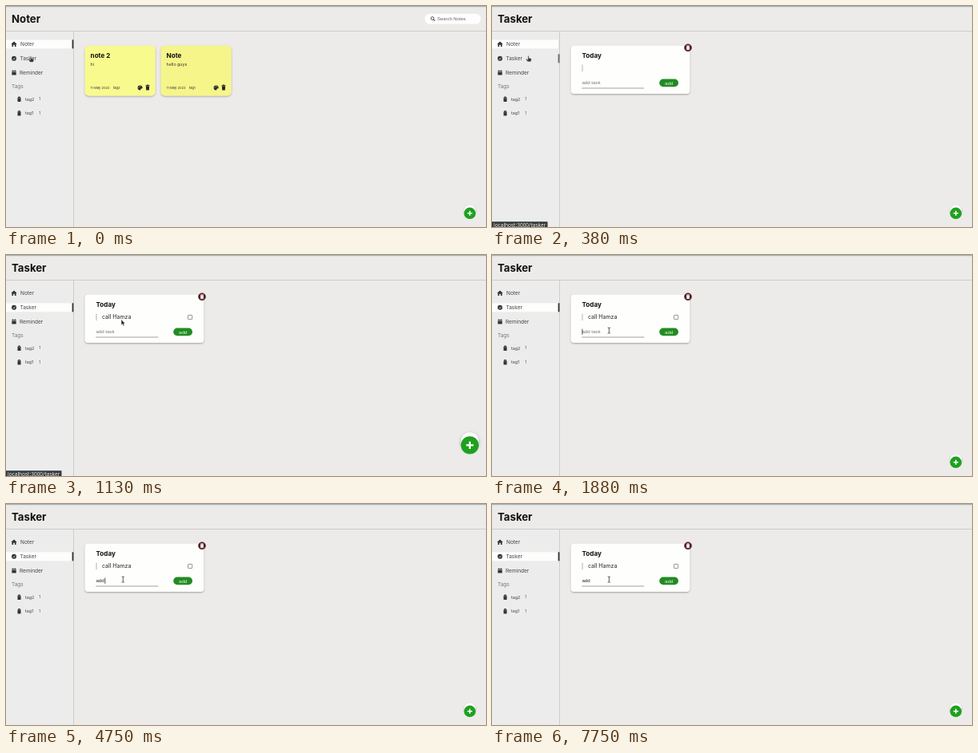
Recreate the animation shown at these times as an HTML page. Size 600 by 277 pixels, loop 8 s.

```html
<!DOCTYPE html>
<html lang="en">
<head>
<meta charset="utf-8">
<title>Notes and tasks</title>
<style>
  html, body { margin: 0; width: 100%; height: 100%; overflow: hidden; background: #ecebe9; }
  svg { display: block; width: 100%; height: 100%; }
  text { font-family: Inter, sans-serif; fill: #333; }
  .title { font-size: 13.2px; font-weight: 700; fill: #111; }
  .head { font-size: 8.1px; font-weight: 700; fill: #111; }
  .nav { font-size: 6.5px; fill: #444; }
  .tag { font-size: 5.4px; fill: #444; }
  .tiny { font-size: 4.1px; }
  .form { font-family: "Liberation Sans", Arial, sans-serif; font-size: 6.1px; }
  .url { font-family: "Noto Sans", sans-serif; font-size: 6.5px; fill: #eee; }
</style>
</head>
<body>
<svg viewBox="0 0 600 277">
  <defs>
    <filter id="shade" x="-20%" y="-20%" width="140%" height="150%">
      <feDropShadow dx="0" dy="1" stdDeviation="1.3" flood-color="#000" flood-opacity=".32"/>
    </filter>
    <g id="trash" fill="#222">
      <path d="M-2.5-3.2H-1L-.6-3.8H.6L1-3.2H2.5V-2.2H-2.5Z"/>
      <path d="M-2.1-1.8H2.1L1.8 3H-1.8Z"/>
    </g>
    <g id="palette">
      <path d="M0-3A3 3 0 1 0 0 3Q1 3 .7 2Q.4.9 1.8 1Q3 1 3 0A3 3 0 0 0 0-3" fill="#222"/>
      <g fill="#f5f78c"><circle cx="-1.6" cy="0" r=".5"/><circle cx="-.6" cy="-1.6" r=".5"/><circle cx="1.1" cy="-1.5" r=".5"/></g>
    </g>
    <g id="tagIcon">
      <path d="M-2 3.3V-1.2L-.9-3.2H.9L2-1.2V3.3Z" fill="#333"/>
      <circle cy="-1.6" r=".5" fill="#ddd"/>
    </g>
  </defs>

  <rect width="600" height="277" fill="#ecebe9"/>
  <rect y="31" width="84" height="246" fill="#ebeceb"/>
  <rect width="600" height="1.2" fill="#9eb2b4"/>
  <path d="M0 31.5H600M84.5 32V277" stroke="#cccccb" fill="none"/>
  <text id="title" class="title" x="7" y="20.5"></text>

  <g id="noterMark">
    <rect y="42.3" width="83" height="11" fill="#fdfdfc"/>
  </g>
  <rect id="noterBar" x="82.6" y="42.3" width="1.8" height="11" fill="#333"/>
  <rect id="taskerMark" y="60.3" width="83" height="11" fill="#fdfdfc"/>
  <rect id="taskerBar" x="82.6" y="60.3" width="1.8" height="11" fill="#333"/>

  <path d="M6.3 47.8L10 44.4L13.7 47.8H12.6V51H10.9V48.8H9.1V51H7.4V47.8Z" fill="#333"/>
  <circle cx="10" cy="65.8" r="3" fill="#333"/>
  <path d="M8.6 65.9L9.7 67L11.5 64.8" stroke="#eee" stroke-width=".8" fill="none"/>
  <path d="M7.3 81.2H8.3V80.3H9.1V81.2H10.9V80.3H11.7V81.2H12.7V82.5H7.3ZM7.3 83H12.7V86.4H7.3Z" fill="#333"/>
  <text class="nav" x="18" y="50.2">Noter</text>
  <text class="nav" x="17.5" y="68.2">Tasker</text>
  <text class="nav" x="17" y="85.8">Reminder</text>
  <text class="nav" x="7" y="102.8" style="fill:#777">Tags</text>
  <use href="#tagIcon" x="16.5" y="116.8"/>
  <text class="tag" x="24" y="118.7">tag2</text>
  <text class="tag" x="41.3" y="118.4" style="font-size:4.6px">1</text>
  <use href="#tagIcon" x="16.5" y="134.3"/>
  <text class="tag" x="24" y="136.2">tag1</text>
  <text class="tag" x="41.3" y="135.9" style="font-size:4.6px">1</text>

  <g id="notes">
    <rect x="523.5" y="9.7" width="70" height="12.8" rx="6.4" fill="#fefefe"/>
    <g fill="none" stroke="#444"><circle cx="533" cy="15.5" r="1.9" stroke-width=".9"/><path d="M534.4 16.9L536.2 18.7" stroke-width="1.1"/></g>
    <text class="form" x="539" y="18.2" style="font-size:5.9px;fill:#666">Search Notes</text>
  </g>

  <g id="tasks">
    <rect x="98.7" y="49.7" width="148.4" height="60.4" rx="4" fill="#fefefd" filter="url(#shade)"/>
    <text class="head" x="112.6" y="64.7">Today</text>
    <path d="M113 73.6V82.2" stroke="#aaa" stroke-width=".9"/>
    <g id="task">
      <text x="120" y="80.4" style="font-size:7px;fill:#222">call Hamza</text>
      <rect x="227.5" y="75.4" width="5.2" height="5.2" rx=".8" fill="#fff" stroke="#777" stroke-width=".8"/>
    </g>
    <text id="input" class="form" x="112.4" y="98.2"></text>
    <path id="caret" d="M0 92.6V99.8" stroke="#222" stroke-width=".8"/>
    <path d="M112.3 103H190.3" stroke="#888" stroke-width=".8"/>
    <rect x="209.2" y="91.6" width="23.8" height="9.6" rx="4.8" fill="#228b22"/>
    <text class="form" x="216" y="98.6" style="fill:#e8f3e8">add</text>
    <circle cx="245" cy="52.3" r="4.6" fill="#43151b" stroke="#8a5358" stroke-width=".7"/>
    <path d="M243.3 50.4H246.7V54.7H243.3ZM243 49.6H247" fill="#f6eeee" stroke="#f6eeee" stroke-width=".6"/>
  </g>

  <g id="fab">
    <circle cy="-3.2" r="7.2" fill="#fcfcfb" filter="url(#shade)"/>
    <circle r="7.3" fill="#1fa01f"/>
    <path d="M-3 0H3M0-3V3" stroke="#fff" stroke-width="1.5"/>
  </g>

  <g id="status">
    <rect y="270.3" width="69.5" height="7" fill="#333a39"/>
    <text class="url" x="2" y="277.2">localhost:3000/tasker</text>
  </g>

  <g id="cursor">
    <path id="hand" d="M-.6.2Q0-.6.6.2V2.6L3.4 3.4Q4 3.8 3.7 5L3 7.3H-.9L-3 4.5Q-2.8 3.3-1.6 4.1L-.6 5Z" fill="#333" stroke="#eee" stroke-width=".4"/>
    <path id="arrow" d="M0 0V6.8L1.5 5.5L2.6 8L3.8 7.4L2.7 5.1H4.7Z" fill="#222" stroke="#eee" stroke-width=".4"/>
    <path id="beam" d="M-1.6-3.6Q0-3.6 0-2.8Q0-3.6 1.6-3.6M0-3V3M-1.6 3.6Q0 3.6 0 2.8Q0 3.6 1.6 3.6" fill="none" stroke="#333" stroke-width=".8"/>
  </g>
</svg>
<script>
const LOOP = 8000, STEP = 125;
const PAGE = 375, LANDED = 1875;
const $ = id => document.getElementById(id);
const show = (id, on) => $(id).setAttribute('opacity', Number(on));
const clamp = v => Math.max(0, Math.min(1, v));
const smooth = v => v * v * (3 - 2 * v);

const pointer = [[0, 31, 63], [125, 33, 63], [375, 45.5, 62.5], [500, 62, 63], [875, 140, 66], [1000, 143, 74], [1375, 146.3, 94.6]];
const blinks = [2500, 3000, 4125, 4750, 5375, 5875, 6500, 7125, 7750];
const keys = [[3125, 'a', 116.4], [3375, 'ad', 119.8], [3500, 'add', 123.8]];

function noteCard(x, fill, name, body, tag) {
  return `<g transform="translate(${x} 49.7)">
    <rect width="88" height="62.8" rx="5" fill="${fill}" filter="url(#shade)"/>
    <text class="head" x="7" y="15.3">${name}</text>
    <text x="7" y="25.8" style="font-size:5.3px">${body}</text>
    <text class="tiny" x="7" y="54.3">11 May 2022</text>
    <text class="tiny" x="35.3" y="54.3">${tag}</text>
    <use href="#palette" x="69" y="52.7"/><use href="#trash" x="78.4" y="52.7"/></g>`;
}
$('notes').insertAdjacentHTML('beforeend',
  noteCard(98.6, '#f8fa8e', 'note 2', 'hi', 'tag2') +
  noteCard(193.6, '#f5f58a', 'Note', 'hello guys', 'tag1'));

function pointerAt(t) {
  const i = pointer.findIndex(p => p[0] > t);
  if (i < 0) return pointer[pointer.length - 1].slice(1);
  const [t0, x0, y0] = pointer[i - 1], [t1, x1, y1] = pointer[i];
  const k = (t - t0) / (t1 - t0);
  return [x0 + (x1 - x0) * k, y0 + (y1 - y0) * k];
}

function drawInput(t) {
  const typed = keys.filter(k => k[0] <= t).pop();
  const input = $('input'), x = typed ? typed[2] : 112.9;
  input.textContent = typed ? typed[1] : 'add task';
  input.style.fill = typed ? '#222' : '#777';
  $('caret').setAttribute('transform', `translate(${x} 0)`);
  show('caret', t >= LANDED && blinks.filter(b => b <= t).length % 2 === 0);
}

function drawFab(t) {
  const p = clamp((t - PAGE) / (LANDED - PAGE));
  const lift = smooth(1 - Math.abs(2 * p - 1)) ** 0.5;
  $('fab').setAttribute('transform', `translate(579.8 ${259.8 - 21.5 * lift}) scale(${1 + 0.53 * lift})`);
}

function draw(time) {
  const t = Math.floor(time / STEP) * STEP;
  const onTasker = t >= PAGE;
  const mark = clamp((t - PAGE) / 250);
  $('title').textContent = onTasker ? 'Tasker' : 'Noter';
  show('notes', !onTasker);
  show('tasks', onTasker);
  show('task', t >= 500);
  show('noterBar', !onTasker);
  show('noterMark', 1 - mark);
  show('taskerMark', mark);
  $('taskerBar').setAttribute('opacity', onTasker ? 0.7 + 0.3 * mark : 0);
  show('status', t >= 125 && t < 1250);

  const [x, y] = pointerAt(t);
  $('cursor').setAttribute('transform', `translate(${x} ${y})`);
  show('hand', x < 84);
  show('arrow', x >= 84 && y < 90);
  show('beam', y >= 90);
  drawInput(t);
  drawFab(t);
}

const start = performance.now();
function tick() {
  draw((performance.now() - start) % LOOP);
  requestAnimationFrame(tick);
}
tick();
</script>
</body>
</html>
```
